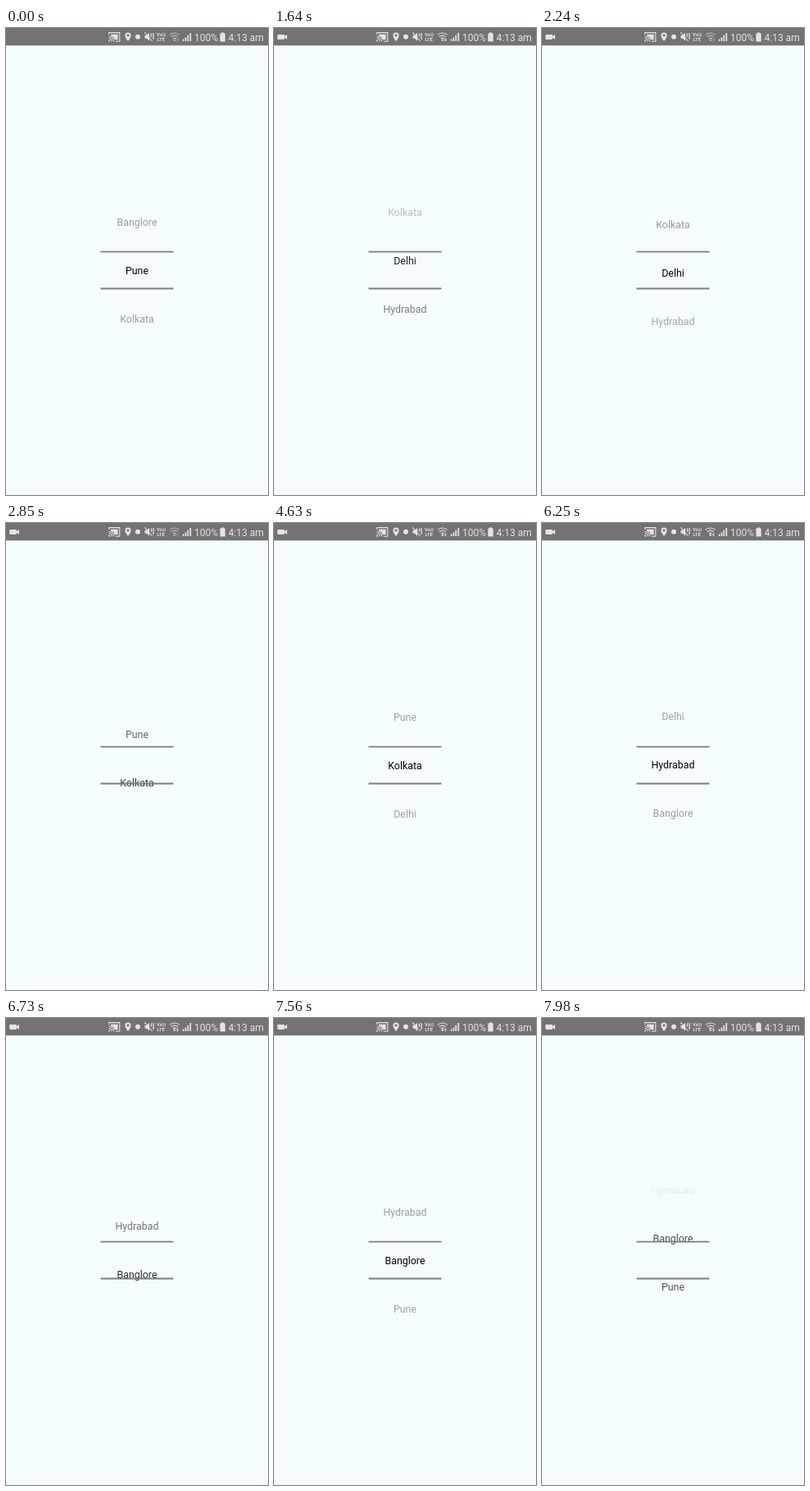
An HTML page that plays this animation: 320x569 px, repeating every 8000 ms.

```html
<!DOCTYPE html>
<html lang="en">
<head>
<meta charset="utf-8">
<title>City wheel picker</title>
<style>
  html, body { margin: 0; width: 100%; height: 100%; overflow: hidden; background: #f5fcff; }
  svg { display: block; width: 100vw; height: 100vh; }
  text { font-family: Roboto, sans-serif; }
  #wheel text { font-size: 12.4px; text-anchor: middle; }
  .status { fill: #e6e4e6; }
  .stroke { fill: none; stroke: #e6e4e6; stroke-width: 1.1; }
</style>
</head>
<body>
<svg viewBox="0 0 320 569">
  <defs>
    <clipPath id="window"><rect x="100" y="207.5" width="120" height="177"/></clipPath>
  </defs>
  <rect width="320" height="569" fill="#f5fcff"/>
  <rect width="320" height="21.3" fill="#757175"/>

  <g class="status">
    <path id="camera" d="M5 8h7q.8 0 .8.8v1.3l3.2-2v5.6l-3.2-2v1.5q0 .8-.8.8h-7q-.8 0-.8-.8v-4.4q0-.8.8-.8z"/>
    <!-- cast -->
    <path class="stroke" d="M125.8 8V5.6h13v10.6h-5M125.6 10.2a6 6 0 0 1 6 6M125.6 12.6a3.6 3.6 0 0 1 3.6 3.6"/>
    <path d="M125.2 14.4a2.2 2.2 0 0 1 2.2 2.2h-2.2zM128 7.8h8.6v6.4h-3.8q-.8-3.600-4.800-4.800z"/>
    <!-- location -->
    <path fill-rule="evenodd" d="M149 5.400a3.600 3.600 0 0 1 3.600 3.600q0 2.600-3.600 7-3.600-4.400-3.600-7a3.600 3.600 0 0 1 3.600-3.600zm0 2a1.600 1.600 0 1 0 .01 0z"/>
    <circle cx="161" cy="10.800" r="3"/>
    <!-- vibrate / mute -->
    <path d="M169.500 9h2.300l3.200-3v9.800l-3.200-3h-2.300z"/>
    <path class="stroke" d="M169.300 5.400l9.400 10.600M177 6.500l1 1.400-1 1.400 1 1.400M179.600 6l1 1.600-1 1.600 1 1.600-1 1.600 1 1.600"/>
    <g font-size="5.800" font-weight="700">
      <text x="184" y="10.200">Vo))</text>
      <text x="184.500" y="16.300">LTE</text>
    </g>
    <!-- wifi -->
    <g id="wifi">
      <path class="stroke" d="M199.800 8.400q6-4.800 12 0M201.800 10.700q4-3.200 8 0M203.800 12.900q2-1.600 4 0"/>
      <circle cx="205.800" cy="14.700" r="1.200"/>
    </g>
    <path id="traffic" d="M208 14.200l1.400-2 1.400 2zM208 14.800h2.800l-1.400 1.800z"/>
    <!-- signal -->
    <path d="M215.800 13.600h1.700V16h-1.700zM218.600 11.400h1.700V16h-1.700zM221.400 8.800h1.700V16h-1.700zM224.400 6h1.700V16h-1.700z"/>
    <text x="230" y="15.600" font-size="12">100%</text>
    <path d="M263 5.500h3.200v1.100h1.500v9.800h-6.300V6.600h1.600z"/>
    <text x="271.600" y="15.600" font-size="12">4:13 am</text>
  </g>

  <g id="wheel" clip-path="url(#window)"></g>
  <path d="M115.500 272.600h89M115.500 317.500h89" stroke="#7b7e81" stroke-width="1.800"/>
</svg>

<script>
const LOOP = 8000, SPACING = 59, CENTER = 296, FADE = 93, LOWER_LIMIT = 70;
const cities = ["Pune", "Kolkata", "Delhi", "Hydrabad", "Banglore"];

// Each move: start ms, end ms, from item, to item, front-loading of the glide.
const moves = [
  [1130, 1920, 0, 3, 1.045],
  [1940, 2730, 3, 0, 1.05],
  [2750, 3490, 0, 1, 6.23],
  [5040, 5760, 1, -2, 1.09],
  [6180, 6960, -2, -1, 0.86],
  [6990, 7110, -1, -1.07, 1],
  [7110, 7240, -1.07, -1, 1],
  [7560, 7860, -1, -1.3, 1],
  [7860, 7980, -1.3, -0.53, 1]
];
const weakWifi = [[0, 90], [530, 580], [2100, 3590]];

const find = id => document.getElementById(id);
const labels = cities.map(city => {
  const label = document.createElementNS("http://www.w3.org/2000/svg", "text");
  label.textContent = city;
  label.setAttribute("x", 160);
  return find("wheel").appendChild(label);
});

function glide(u, power) {
  const x = 1 - (1 - u) ** power;
  return x * x * (3 - 2 * x);
}

function wheelPosition(time) {
  let position = 0;
  for (const [start, end, from, to, power] of moves) {
    if (time < start) break;
    const u = Math.min(1, (time - start) / (end - start));
    position = from + (to - from) * glide(u, power);
  }
  return position;
}

function draw(time) {
  const position = wheelPosition(time);
  labels.forEach((label, i) => {
    const turns = (i - position) / cities.length;
    const distance = (turns - Math.round(turns)) * cities.length * SPACING;
    const alpha = distance < LOWER_LIMIT ? Math.max(0, 1 - Math.abs(distance) / FADE) : 0;
    label.setAttribute("y", CENTER + 4.4 + distance);
    label.setAttribute("opacity", alpha);
  });

  const weak = weakWifi.some(([start, end]) => time >= start && time < end);
  find("camera").setAttribute("opacity", time < 90 ? 0 : 1);
  find("wifi").setAttribute("opacity", weak ? 0.65 : 1);
  find("traffic").setAttribute("opacity", weak ? 0.4 : 1);
}

const begin = performance.now();
function tick() {
  draw((performance.now() - begin) % LOOP);
  requestAnimationFrame(tick);
}
tick();
</script>
</body>
</html>
```
